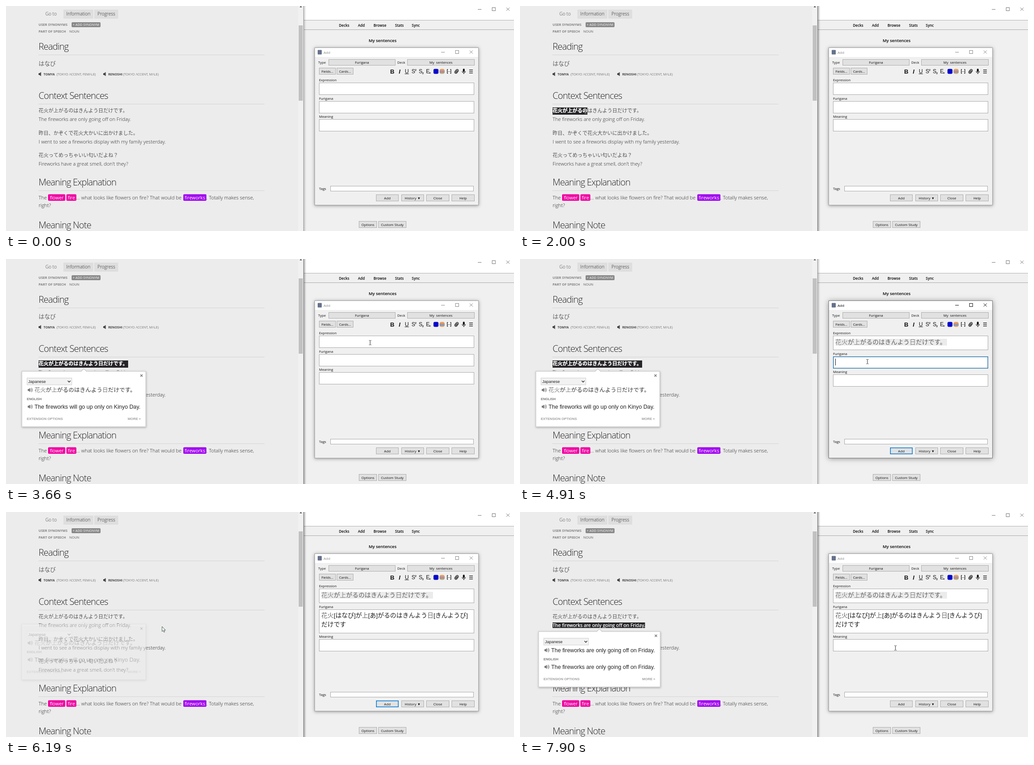
Animation of 1123 by 499 pixels, one loop 8 s. Source, as an HTML page with a canvas:

```html
<!DOCTYPE html>
<html lang="en">
<head>
<meta charset="utf-8">
<title>Sentence card demo</title>
<style>
html, body { margin: 0; width: 100%; height: 100%; overflow: hidden; background: #ececec; }
canvas { display: block; }
</style>
</head>
<body>
<canvas id="stage" width="1123" height="499"></canvas>
<script>
const ctx = document.getElementById('stage').getContext('2d');
const LOOP = 8000;
const UI = '"Open Sans", "Noto Sans", sans-serif';
const JP = '"Noto Sans CJK JP", "Noto Sans CJK", sans-serif';
const ARIAL = '"Liberation Sans", "Noto Sans CJK JP", sans-serif';
const BODY = `300 11px ${UI}`;
const BODY_STRONG = `10.5px ${UI}`;
const INK = '#222';
const JP_INK = '#505050';
const LABEL = `7.7px ${UI}`;
const JP_LINE = '花火が上がるのはきんよう日だけです。';
const EN_LINE = 'The fireworks are only going off on Friday.';
const LEFT = 72;

// Mouse path: time, x, y
const path = [
  [300, 694, 434], [1080, 83, 232], [1130, 83, 232], [1290, 79, 233], [1440, 79, 233],
  [1520, 78, 233], [1680, 71, 233], [2460, 256, 234], [2540, 273, 230], [2690, 273, 230],
  [2770, 269, 232], [2920, 269, 232], [3160, 807, 209], [3440, 807, 209], [3600, 805, 185],
  [4290, 805, 185], [4830, 768, 227], [5310, 768, 227], [6050, 498, 262], [6190, 345, 254],
  [6890, 70, 252], [6970, 70, 252], [7360, 298, 252], [7530, 298, 252], [7900, 830, 301]
];

const clamp = v => Math.max(0, Math.min(1, v));
const steps = (t, from, to, n) =>
  clamp((Math.floor((t - from) / (to - from) * (n - 1) + 1e-6) + 1) / n);

function mouseAt(t) {
  if (t < path[0][0]) return null;
  let i = path.length - 1;
  while (path[i][0] > t) i--;
  const a = path[i], b = path[i + 1] || a;
  const span = b[0] - a[0];
  const n = Math.max(1, Math.round(span / 78));
  const u = span ? Math.floor((t - a[0]) / span * n + 1e-6) / n : 0;
  return { x: a[1] + (b[1] - a[1]) * u, y: a[2] + (b[2] - a[2]) * u };
}

function text(s, x, y, font, color, align = 'left', spacing = 0) {
  ctx.font = font;
  ctx.fillStyle = color;
  ctx.textAlign = align;
  ctx.letterSpacing = spacing + 'px';
  ctx.fillText(s, x, y);
  ctx.letterSpacing = '0px';
}

function rect(x, y, w, h, fill, stroke, width = 1) {
  if (fill) {
    ctx.fillStyle = fill;
    ctx.fillRect(x, y, w, h);
  }
  if (stroke) {
    ctx.strokeStyle = stroke;
    ctx.lineWidth = width;
    ctx.strokeRect(x + width / 2, y + width / 2, w - width, h - width);
  }
}

function round(x, y, w, h, r, fill) {
  ctx.fillStyle = fill;
  ctx.beginPath();
  ctx.roundRect(x, y, w, h, r);
  ctx.fill();
}

function line(color, width, ...points) {
  ctx.strokeStyle = color;
  ctx.lineWidth = width;
  ctx.beginPath();
  points.forEach(([x, y], i) => i ? ctx.lineTo(x, y) : ctx.moveTo(x, y));
  ctx.stroke();
}

function polygon(color, ...points) {
  ctx.fillStyle = color;
  ctx.beginPath();
  points.forEach(([x, y]) => ctx.lineTo(x, y));
  ctx.closePath();
  ctx.fill();
}

function shadow(blur, color, draw) {
  ctx.save();
  ctx.shadowBlur = blur;
  ctx.shadowColor = color;
  ctx.shadowOffsetY = 1;
  draw();
  ctx.restore();
}

// Kanji are drawn paler than kana
function mixed(s, x, y, size, kana, kanji) {
  for (const run of s.match(/[\u4e00-\u9fff]+|[^\u4e00-\u9fff]+/g)) {
    const isKanji = /[\u4e00-\u9fff]/.test(run);
    text(run, x, y, isKanji ? `300 ${size}px ${JP}` : `${size}px ${ARIAL}`, isKanji ? kanji : kana);
    x += ctx.measureText(run).width;
  }
}

function button(label, x, y, w, h, isDefault) {
  rect(x, y, w, h, '#e1e1e1', isDefault ? '#0078d7' : '#adadad', isDefault ? 1.5 : 1);
  text(label, x + w / 2, y + h / 2 + 3, LABEL, '#111', 'center');
}

function windowButtons(x, y, gap, color) {
  line(color, 1, [x - 4, y + .5], [x + 4, y + .5]);
  rect(x + gap - 4, y - 4, 8, 8, null, color);
  const c = x + 2 * gap;
  line(color, 1, [c - 3.5, y - 3.5], [c + 3.5, y + 3.5]);
  line(color, 1, [c + 3.5, y - 3.5], [c - 3.5, y + 3.5]);
}

function speaker(x, y, color, waves) {
  polygon(color, [x, y - 2], [x + 2, y - 2], [x + 5.5, y - 4.5], [x + 5.5, y + 4.5], [x + 2, y + 2], [x, y + 2]);
  if (!waves) return;
  ctx.strokeStyle = color;
  ctx.lineWidth = 1.1;
  for (const r of [2.5, 5]) {
    ctx.beginPath();
    ctx.arc(x + 5.5, y, r, -1.1, 1.1);
    ctx.stroke();
  }
}

function heading(s, y, ruled = true) {
  text(s, LEFT, y, `300 20px ${UI}`, INK, 'left', -.85);
  if (!ruled) return;
  ctx.setLineDash([1, 1]);
  line('#bcbcbc', 1, [LEFT, y + 11.5], [571, y + 11.5]);
  ctx.setLineDash([]);
}

function pill(s, x, w, color) {
  round(x, 417.5, w, 14.5, 2, color);
  text(s, x + w / 2, 429, BODY_STRONG, '#fff', 'center');
}

function voice(name, accent, x, accentX) {
  speaker(x, 151, '#444');
  text(name, x + 11, 154, `bold 7px ${UI}`, '#444');
  text(`(TOKYO ACCENT, ${accent})`, accentX, 154, `300 7.5px ${UI}`, '#333');
}

function selection(s, x, y, w, h, baseline, font) {
  if (w <= 0) return;
  ctx.save();
  ctx.beginPath();
  ctx.rect(x, y, w, h);
  ctx.clip();
  rect(x, y, w, h, '#272528');
  text(s, x, baseline, font, '#fff');
  text(s, x, baseline, font, '#fff');
  ctx.restore();
}

// Widest run of whole characters that ends near x
function snappedWidth(s, font, x) {
  ctx.font = font;
  let width = 0;
  for (let i = 1; i <= s.length; i++) {
    const next = ctx.measureText(s.slice(0, i)).width;
    if ((width + next) / 2 > x) break;
    width = next;
  }
  return width;
}

function drawPage(t, mouse) {
  rect(0, 0, 646, 499, '#ececec');
  rect(127, 8, 66, 20, '#dedede');
  rect(195, 8, 53, 20, '#dedede');
  const tab = `300 10.1px ${UI}`;
  text('Go to', 87, 21, tab, '#444');
  text('Information', 133.5, 21, tab, INK);
  text('Progress', 202, 21, tab, INK);

  const small = `bold 7.5px ${UI}`;
  text('USER SYNONYMS', LEFT, 44, small, '#808080');
  round(145, 36, 64, 11, 2, '#888');
  text('+ ADD SYNONYM', 147.5, 44, `7.3px ${UI}`, '#fff');
  text('PART OF SPEECH', LEFT, 58.5, small, '#808080');
  text('NOUN', 140, 58.5, `7.3px ${UI}`, '#555');

  heading('Reading', 97);
  text('はなび', LEFT, 132, `300 12.7px ${JP}`, '#606060');
  voice('TOMYA', 'FEMALE', 72, 112);
  voice('RENOSHI', 'MALE', 215, 259);

  heading('Context Sentences', 206);
  const jp = `300 11px ${JP}`;
  text(JP_LINE, LEFT, 236, jp, JP_INK);
  text(EN_LINE, LEFT, 255, BODY, INK);
  text('昨日、かぞくで花火大かいに出かけました。', LEFT, 286, jp, JP_INK);
  text('I went to see a fireworks display with my family yesterday.', LEFT, 304.5, BODY, INK);
  text('花火ってめっちゃいい匂いだよね？', LEFT, 335, jp, JP_INK);
  text("Fireworks have a great smell, don't they?", LEFT, 354, BODY, INK);

  heading('Meaning Explanation', 398);
  text('The', LEFT, 429, BODY, INK);
  pill('flower', 93, 38, '#f100a1');
  pill('fire', 133.5, 22, '#f100a1');
  text('... what looks like flowers on fire? That would be', 155.5, 429, BODY, INK);
  pill('fireworks', 392, 51, '#a000f1');
  text('. Totally makes sense,', 443, 429, BODY, INK);
  text('right?', LEFT, 446, BODY, INK);
  heading('Meaning Note', 493, false);

  if (t >= 1680 && t < 6050) {
    const chars = t < 2540 ? Math.max(0, Math.round((mouse.x - LEFT) / 11)) : 18;
    selection(JP_LINE, LEFT, 225, chars * 11, 16, 236, `bold 11px ${JP}`);
  }
  if (t >= 6970) {
    const reach = t < 7360 ? mouse.x - LEFT : 999;
    selection(EN_LINE, LEFT, 245, snappedWidth(EN_LINE, BODY_STRONG, reach), 12.5, 255, BODY_STRONG);
  }

  rect(646, 0, 12, 499, '#f1f1f1');
  rect(647, 43, 9, 167, '#c1c1c1');
  polygon('#505050', [649, 3], [654.5, 3], [651.7, 0]);
}

function drawPopup(x, y, w, alpha, top, bottom) {
  if (alpha <= 0) return;
  ctx.save();
  ctx.globalAlpha = alpha;
  shadow(4, 'rgba(0,0,0,.3)', () => rect(x, y, w, 124, '#fff'));
  rect(x, y, w, 124, '#fff', '#b4b4b4');
  const tip = x + w / 2;
  polygon('#fff', [tip - 6, y + 1.5], [tip, y - 4.5], [tip + 6, y + 1.5]);
  line('#b4b4b4', 1, [tip - 6, y + .5], [tip, y - 5], [tip + 6, y + .5]);

  const left = x + 11.5, right = x + w - 11.5;
  line('#777', 1.4, [right - 1, y + 7.5], [right + 4, y + 12.5]);
  line('#777', 1.4, [right + 4, y + 7.5], [right - 1, y + 12.5]);
  rect(left, y + 15, 100, 16, '#f2f2f2', '#d0d0d0');
  text('Japanese', left + 3, y + 26.5, `9px ${ARIAL}`, '#222');
  line('#222', 1.3, [left + 90.5, y + 21.5], [left + 93.5, y + 24.5], [left + 96.5, y + 21.5]);
  const phrase = (s, baseline) => {
    speaker(left + 2, baseline - 4, '#777', true);
    if (s === JP_LINE) mixed(s, left + 17, baseline, 12.5, '#333', '#777');
    else text(s, left + 17, baseline, `12.33px ${ARIAL}`, '#222');
  };
  phrase(top, y + 46);
  text('ENGLISH', left, y + 64.5, `bold 7.4px ${ARIAL}`, '#777');
  phrase(bottom, y + 83);
  const foot = `bold 7.55px ${ARIAL}`;
  text('EXTENSION OPTIONS', left, y + 108.5, foot, '#a0a0a0');
  text('MORE »', right, y + 108.5, foot, '#a0a0a0', 'right');
  ctx.restore();
}

function drawDeckWindow(t) {
  rect(658, 0, 465, 499, '#f0f0f0');
  rect(658, 0, 465, 31, '#fff');
  rect(658, 31, 465, 1, '#b0b0b0');
  rect(658, 52, 465, 1, '#a8a8a8');
  windowButtons(1047, 7, 31.3, '#777');
  const menu = [['Decks', 736], ['Add', 778], ['Browse', 812.5], ['Stats', 860], ['Sync', 897]];
  for (const [label, x] of menu) text(label, x, 45.5, `600 8px ${UI}`, '#000');
  text('My sentences', 832.5, 79.5, `600 9.4px ${UI}`, '#000', 'center');
  button('Options', 780, 477, 40, 15);
  button('Custom Study', 823, 477, 62, 15);

  const pageActive = (t >= 1680 && t < 3750) || t >= 6050;
  const edge = ctx.createLinearGradient(658, 0, 664, 0);
  edge.addColorStop(0, `rgba(0,0,0,${pageActive ? .3 : .18})`);
  edge.addColorStop(1, 'rgba(0,0,0,0)');
  rect(658, 0, 6, 499, edge);
  rect(657.5, 0, 1, 499, pageActive ? '#666' : '#888');
}

function drawToolbar() {
  const ink = '#111', icon = `12px ${ARIAL}`;
  text('B', 854, 149.5, `bold 13px ${ARIAL}`, ink, 'center');
  text('I', 870, 149.5, `italic bold 13px ${ARIAL}`, ink, 'center');
  text('U', 886, 148.5, icon, ink, 'center');
  line(ink, 1, [881.5, 150.5], [890.5, 150.5]);
  text('S', 896.5, 149, icon, ink);
  text('2', 904, 144, `bold 6px ${ARIAL}`, ink);
  text('S', 912.5, 149, icon, ink);
  text('2', 920, 151, `bold 6px ${ARIAL}`, ink);
  text('E', 928.5, 149, icon, ink);
  text('x', 935.5, 150, `bold 6px ${ARIAL}`, ink);
  round(945, 139.5, 11, 11, 3, '#0505cc');
  round(958.5, 139.5, 11, 11, 4, '#e5a05c');
  rect(958.5, 143, 11, 2.5, '#c98a8e');
  rect(958.5, 145.5, 11, 2.5, '#6fa3c8');
  line(ink, 1.2, [977, 140.5], [975.5, 140.5], [975.5, 149.5], [977, 149.5]);
  line(ink, 1.2, [982, 140.5], [983.5, 140.5], [983.5, 149.5], [982, 149.5]);
  for (const x of [977, 979, 981]) rect(x, 145, 1, 1, ink);

  ctx.save();
  ctx.translate(996, 145);
  ctx.rotate(.65);
  ctx.strokeStyle = ink;
  ctx.lineWidth = 1.2;
  ctx.beginPath();
  ctx.roundRect(-2.8, -5, 5.6, 10, 2.8);
  ctx.roundRect(-.9, -2.5, 2, 5.5, 1);
  ctx.stroke();
  ctx.restore();

  round(1010, 139, 4, 7.5, 2, ink);
  ctx.strokeStyle = ink;
  ctx.lineWidth = 1.1;
  ctx.beginPath();
  ctx.arc(1012, 144.5, 3.7, 0, Math.PI);
  ctx.stroke();
  rect(1011.5, 148, 1, 3, ink);
  for (const y of [141, 144.5, 148]) rect(1024, y, 8, 1.2, ink);
}

function fieldLayout(t) {
  const first = t >= 4290 ? 32 : 27;
  const second = t >= 5310 ? 53 : 27;
  return [
    { label: 'Expression', y: 170, h: first },
    { label: 'Furigana', y: 184 + first, h: second },
    { label: 'Meaning', y: 197 + first + second, h: 27 }
  ];
}

function drawDialog(t, fields) {
  const active = t >= 3750 && t < 6050;
  const focus = !active ? -1 : t < 4910 ? 0 : 1;
  shadow(active ? 11 : 7, 'rgba(0,0,0,.4)', () => rect(682, 92, 363, 350, '#f0f0f0'));
  rect(682, 92, 363, 350, '#f0f0f0');
  rect(683, 93, 361, 20, '#fff');
  rect(682, 92, 363, 350, null, active ? '#777' : '#a0a0a0');
  round(689, 97.5, 9, 10, 1, '#66718c');
  text('Add', 702, 105.5, `8px ${UI}`, active ? '#000' : '#888');
  windowButtons(966, 102, 31.2, active ? '#111' : '#888');

  text('Type', 690, 128, LABEL, '#111');
  button('Furigana', 713, 118, 148, 14);
  text('Deck', 865, 128, LABEL, '#111');
  button('My  sentences', 887, 118, 149, 14);
  button('Fields...', 692, 137, 37, 15);
  button('Cards...', 731, 137, 37, 15);
  drawToolbar();

  fields.forEach((f, i) => {
    text(f.label, 692, f.y - 3.5, LABEL, '#111');
    rect(692, f.y, 343, f.h, '#fff', i === focus ? '#3079ab' : '#a9a9a9', i === focus ? 1.5 : 1);
  });
  if (t >= 4290) {
    rect(697, 177, 247, 15, '#ebebeb');
    mixed(JP_LINE, 697, 188.5, 13.7, '#606060', '#858585');
  }
  if (t >= 5310) {
    mixed('花火[はなび]が上[あ]がるのはきんよう日[きんようび]', 697, 234, 13.7, '#1c1c1c', '#666');
    mixed('だけです', 697, 254, 13.7, '#1c1c1c', '#666');
  }
  if (focus === 0) rect(t < 4290 ? 697 : 944, 175, 1, 16, '#111');
  if (focus === 1) rect(t < 5310 ? 697 : 752, t < 5310 ? 221 : 242, 1, 15, '#111');

  text('Tags', 692, 408, LABEL, '#111');
  rect(717, 399, 317, 12, '#fff', '#a9a9a9');
  button('Add', 818, 418, 50, 15, t >= 3750 && t < 7750);
  button('History ▼', 874, 418, 50, 15);
  button('Close', 929, 418, 51, 15);
  button('Help', 985, 418, 51, 15);
}

function drawMouse(t, mouse, fields) {
  if (!mouse || (t >= 3980 && t < 4290)) return;
  const { x, y } = mouse;
  const overField = x > 692 && x < 1035 && fields.some(f => y > f.y && y < f.y + f.h);
  const overText = x < 310 && y > 225 && y < 260;
  if (overField || overText) {
    ctx.save();
    ctx.globalCompositeOperation = 'difference';
    const cx = Math.round(x), cy = Math.round(y);
    rect(cx - .5, cy - 4, 1, 9, '#ddd');
    for (const end of [cy - 5, cy + 5]) {
      rect(cx - 2.5, end, 2, 1, '#bbb');
      rect(cx + .5, end, 2, 1, '#bbb');
    }
    ctx.restore();
    return;
  }
  const outline = [[0, 0], [0, 11], [2.5, 8.8], [4.2, 12.6], [6, 11.8], [4.3, 8.1], [7.6, 8.1]]
    .map(([dx, dy]) => [x + dx, y + dy]);
  polygon('#fff', ...outline);
  line('#2c4a36', .9, ...outline, outline[0]);
}

function draw(t) {
  const mouse = mouseAt(t);
  const fields = fieldLayout(t);
  drawPage(t, mouse);
  const fade = t < 6050 ? steps(t, 2920, 3160, 4) : [.8, .5, .25][Math.floor((t - 6050) / 70)] || 0;
  drawPopup(34.5, 248.5, 275, fade, JP_LINE, 'The fireworks will go up only on Kinyo Day.');
  drawPopup(40.5, 264.5, 270, steps(t, 7530, 7750, 4), EN_LINE, EN_LINE);
  drawDeckWindow(t);
  drawDialog(t, fields);
  drawMouse(t, mouse, fields);
}

function tick() {
  draw(performance.now() % LOOP);
  requestAnimationFrame(tick);
}
tick();
</script>
</body>
</html>
```
